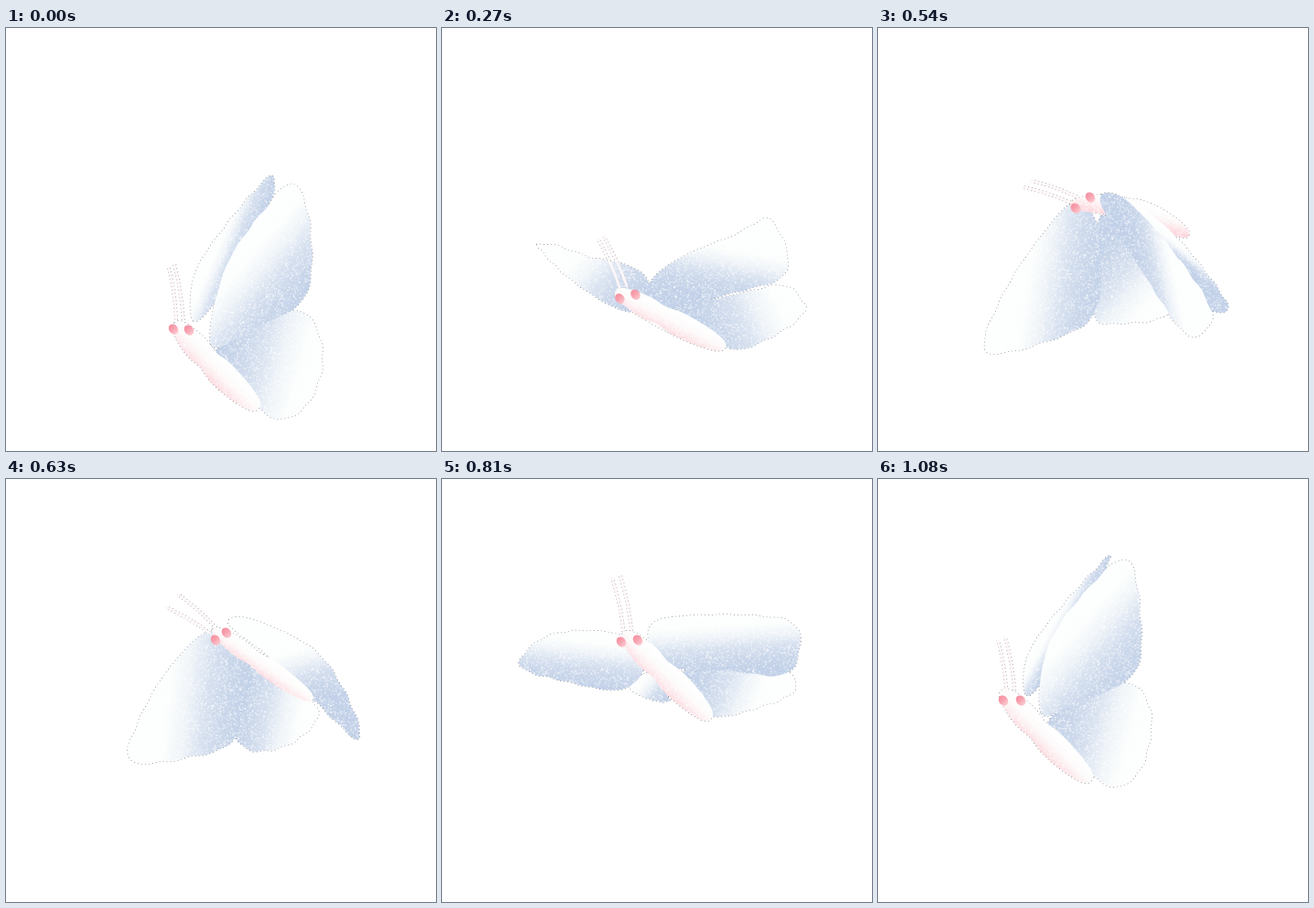
Write an HTML page with a canvas that moves like this. It is 470x462 px and loops after 1.17 s.

```html
<!DOCTYPE html>
<html lang="en">
<head>
<meta charset="utf-8">
<title>White moth</title>
<style>
  html, body { margin: 0; width: 100%; height: 100%; overflow: hidden; background: #fff; }
  canvas { display: block; }
</style>
</head>
<body>
<canvas id="stage" width="470" height="462"></canvas>
<script>
const ctx = document.getElementById('stage').getContext('2d');
const STEP = 90, COUNT = 13, SAMPLES = 100, TAU = Math.PI * 2;
const WINGS = [...'FGNH'];

// Wings (F/G far fore and hind, N/H near fore and hind): pale side as a share
// of the outline, then a few key points clockwise from the root.
// body: head end, tail end, half width, bend. eyes, tips: two points each.
const poses = [
  { at: 0,
    F: [.25, 205,320, 206,270, 240,216, 290,161, 285,200, 235,290],
    G: [.2, 215,345, 240,365, 255,390, 230,380],
    N: [.25, 224,346, 240,262, 285,195, 314,170, 332,215, 327,293, 270,328],
    H: [.5, 232,350, 318,309, 346,355, 330,410, 290,425, 240,370],
    body: [184,322, 276,416, 15,2], eyes: [183,329, 200,330], tips: [178,262, 184,258] },
  { at: 2,
    F: [.4, 222,305, 193,300, 152,248, 144,186, 160,184, 195,220, 225,238, 242,265],
    G: [.2, 225,318, 250,338, 270,360, 240,345],
    N: [.25, 226,306, 265,239, 315,192, 346,160, 365,215, 370,258, 300,305, 248,332],
    H: [.55, 250,331, 300,304, 365,271, 385,290, 375,332, 322,383, 280,360],
    body: [188,303, 302,384, 14,0], eyes: [191,311, 210,309], tips: [176,250, 183,246] },
  { at: 4,
    F: [.75, 235,290, 205,307, 150,300, 85,298, 120,288, 195,274],
    G: [.2, 215,303, 260,300, 308,321, 265,323],
    N: [.3, 225,262, 245,248, 310,258, 370,266, 381,298, 320,288, 250,278],
    H: [.25, 262,277, 320,282, 400,308, 375,321, 316,312],
    body: [193,265, 317,308, 13,0], eyes: [199,273, 214,266], tips: [165,209, 170,206] },
  { at: 6, order: 'GFBHN',
    F: [.75, 216,190, 242,225, 237,310, 185,342, 118,353, 135,295, 175,232],
    G: [.4, 244,205, 290,260, 317,310, 270,322, 235,310],
    N: [.3, 243,190, 270,187, 325,247, 365,312, 338,335, 290,268],
    H: [.25, 265,185, 320,222, 380,298, 365,308, 325,255],
    body: [210,192, 340,226, 12,-12], eyes: [216,197, 232,185], tips: [159,174, 168,167] },
  { at: 7,
    F: [.75, 228,165, 268,208, 250,282, 205,303, 137,308, 145,265, 180,205],
    G: [.35, 266,206, 339,248, 318,285, 270,297, 249,270],
    N: [.2, 243,158, 268,153, 337,187, 375,242, 385,285, 335,240, 285,192],
    H: [.2, 270,175, 330,220, 360,250, 320,225],
    body: [226,164, 335,241, 11,0], eyes: [229,176, 241,168], tips: [175,140, 188,126] },
  { at: 9,
    F: [.75, 220,205, 195,230, 135,221, 85,203, 120,170, 193,170],
    G: [.1, 205,225, 230,212, 248,242, 220,238],
    N: [.25, 226,178, 240,153, 335,149, 388,162, 378,212, 310,209, 245,204],
    H: [.55, 262,212, 320,207, 378,212, 384,232, 350,248, 293,258],
    body: [198,168, 294,262, 15,0], eyes: [196,178, 214,176], tips: [186,108, 195,106] },
  { at: 12,
    F: [.25, 161,235, 163,195, 192,150, 254,83, 230,130, 180,220],
    G: [.2, 165,250, 190,275, 205,298, 180,285],
    N: [.25, 178,255, 185,185, 225,125, 272,88, 287,155, 278,214, 210,248],
    H: [.5, 188,262, 268,223, 298,255, 288,315, 255,336, 212,300],
    body: [135,231, 233,330, 15,2], eyes: [137,242, 156,242], tips: [131,176, 139,173] }
];

// Closed smooth curve through the points, resampled evenly along its length.
function outline(flat) {
  const n = flat.length / 2, pts = [], len = [0], out = [];
  const coord = (i, k) => flat[((i + n) % n) * 2 + k];
  for (let i = 0; i < n; i++) for (let u = 0; u < 1; u += 1 / 16) {
    pts.push([0, 1].map(k => {
      const a = coord(i - 1, k), b = coord(i, k), c = coord(i + 1, k), d = coord(i + 2, k);
      return b + u / 2 * (c - a + u * (2 * a - 5 * b + 4 * c - d + u * (3 * (b - c) + d - a)));
    }));
  }
  pts.push(pts[0]);
  for (let i = 1; i < pts.length; i++)
    len.push(len[i - 1] + Math.hypot(pts[i][0] - pts[i - 1][0], pts[i][1] - pts[i - 1][1]));
  for (let j = 0, i = 0; j < SAMPLES; j++) {
    const goal = len[len.length - 1] * j / SAMPLES;
    while (len[i + 1] <= goal) i++;
    const u = (goal - len[i]) / (len[i + 1] - len[i]);
    for (const k of [0, 1]) out.push(pts[i][k] + u * (pts[i + 1][k] - pts[i][k]));
  }
  return out;
}

for (const p of poses) for (const k of WINGS) p[k] = [p[k][0], ...outline(p[k].slice(1))];

// Hermite blend between the poses on either side of a drawing's index.
function blend(index, key) {
  const last = poses.length - 1;
  const next = poses.findIndex(p => p.at > index);
  const i = next < 0 ? last - 1 : next - 1;
  const a = poses[i], b = poses[i + 1], span = b.at - a.at, u = (index - a.at) / span;
  const slope = (m, k) => {
    const p = poses[Math.max(m - 1, 0)], q = poses[Math.min(m + 1, last)];
    return (q[key][k] - p[key][k]) / (q.at - p.at) * span;
  };
  return a[key].map((v, k) => v + u * u * (3 - 2 * u) * (b[key][k] - v)
    + u * (1 - u) * ((1 - u) * slope(i, k) - u * slope(i + 1, k)));
}

function closedPath(pts) {
  const path = new Path2D();
  for (const [x, y] of pts) path.lineTo(x, y);
  path.closePath();
  return path;
}

function ramp(from, to, colors) {
  const g = ctx.createLinearGradient(...from, ...to);
  colors.forEach((c, i) => g.addColorStop(i / (colors.length - 1), c));
  return g;
}

const wingTones = ['#c2d1e8', '#c9d6ea', '#d6e0ef', '#eef3f8', '#fcfefd', '#fdfffe'];
const bodyTones = ['#fcd9df', '#fdecee', '#fdfafa', '#fdfefd'];
const eyeTones = ['#f58a9c', '#f8a5b2', '#fcd3d8'];

// A gently scalloped wing, shaded from its deep side across to its pale side.
function makeWing([pale, ...flat]) {
  const at = i => { const m = (i + SAMPLES) % SAMPLES * 2; return [flat[m], flat[m + 1]]; };
  const pts = Array.from({ length: SAMPLES }, (_, i) => {
    const [x, y] = at(i), [px, py] = at(i - 1), [qx, qy] = at(i + 1);
    const size = Math.hypot(qx - px, qy - py) || 1, u = i / SAMPLES;
    const wave = Math.sin(TAU * 13 * u) * Math.sin(Math.PI * u) ** 2 / size;
    return [x + (qy - py) * wave, y - (qx - px) * wave];
  });
  const side = u => at(Math.round(u * SAMPLES));
  return { path: closedPath(pts), fill: ramp(side(pale + .5), side(pale), wingTones) };
}

// The body is a rounded spindle with a narrow waist behind the thorax.
function makeBody([x0, y0, x1, y1, half, bend]) {
  const size = Math.hypot(x1 - x0, y1 - y0);
  const nx = (y0 - y1) / size, ny = (x1 - x0) / size;
  const at = (u, off) => {
    const d = off + bend * Math.sin(Math.PI * u);
    return [x0 + (x1 - x0) * u + nx * d, y0 + (y1 - y0) * u + ny * d];
  };
  const pts = Array.from({ length: SAMPLES }, (_, i) => {
    const a = TAU * i / SAMPLES, u = (1 - Math.cos(a)) / 2;
    const waist = 1 - .2 * Math.exp(-(((u - .42) / .09) ** 2));
    return at(u, -Math.sign(Math.sin(a)) * half * Math.abs(Math.sin(a)) ** .75 * waist);
  });
  return { path: closedPath(pts), fill: ramp(at(.6, half), at(.6, -half / 2), bodyTones) };
}

// Feelers spring from between the eyes and bow slightly.
function makeFeelers([ax, ay, bx, by], tips) {
  const path = new Path2D(), mx = (ax + bx) / 2, my = (ay + by) / 2;
  [[ax, ay], [bx, by]].forEach(([ex, ey], i) => {
    const tx = tips[2 * i], ty = tips[2 * i + 1];
    const size = Math.hypot(tx - mx, ty - my), dx = (tx - mx) / size, dy = (ty - my) / size;
    const x = mx + (ex - mx) * .4 + dx * 11, y = my + (ey - my) * .4 + dy * 11;
    path.moveTo(x, y);
    path.quadraticCurveTo((x + tx) / 2 - dy * 3, (y + ty) / 2 + dx * 3, tx, ty);
  });
  return path;
}

const drawings = Array.from({ length: COUNT }, (_, i) => {
  const shapes = { B: makeBody(blend(i, 'body')) };
  for (const k of WINGS) shapes[k] = makeWing(blend(i, k));
  const order = poses.filter(p => p.at <= i).pop().order || 'GFHNB';
  const eyes = blend(i, 'eyes');
  return { layers: [...order].map(k => shapes[k]), eyes, feelers: makeFeelers(eyes, blend(i, 'tips')) };
});

// Seeded white grain, visible only over the shaded areas.
function makeGrain() {
  const tile = document.createElement('canvas'), size = tile.width = tile.height = 160;
  const g = tile.getContext('2d');
  let seed = 7;
  const rand = () => (seed = seed * 16807 % 2147483647) / 2147483647;
  for (let i = 0; i < 6000; i++) {
    g.fillStyle = `rgba(255,255,255,${.5 * rand()})`;
    g.fillRect(Math.floor(rand() * size), Math.floor(rand() * size), 1 + rand(), 1 + rand());
  }
  return ctx.createPattern(tile, 'repeat');
}
const grain = makeGrain();

function stroke(path, width, color) {
  ctx.lineWidth = width;
  ctx.strokeStyle = color;
  ctx.stroke(path);
}

function draw({ layers, eyes, feelers }) {
  ctx.fillStyle = '#fff';
  ctx.fillRect(0, 0, 470, 462);

  // Dotted rims go down first, so only the outer silhouette keeps them.
  ctx.lineCap = 'butt';
  ctx.setLineDash([1, 3]);
  stroke(feelers, 4, 'rgba(70,65,75,.55)');
  for (const s of layers) stroke(s.path, 1.5, 'rgba(55,60,75,.6)');
  ctx.setLineDash([]);

  for (const s of layers) for (const paint of [s.fill, grain]) {
    ctx.fillStyle = paint;
    ctx.fill(s.path);
  }

  ctx.lineCap = 'round';
  stroke(feelers, 2.6, '#fef7f8');
  for (const o of [0, 2]) {
    const x = eyes[o], y = eyes[o + 1];
    ctx.fillStyle = ramp([x - 5, y - 5], [x + 5, y + 5], eyeTones);
    ctx.beginPath();
    ctx.ellipse(x, y, 6, 4.8, .9, 0, TAU);
    ctx.fill();
  }
}

let shown = -1;
function tick(now) {
  const i = Math.floor(Math.max(now, 0) / STEP) % COUNT;
  if (i !== shown) draw(drawings[shown = i]);
  requestAnimationFrame(tick);
}
tick(performance.now());
</script>
</body>
</html>
```
